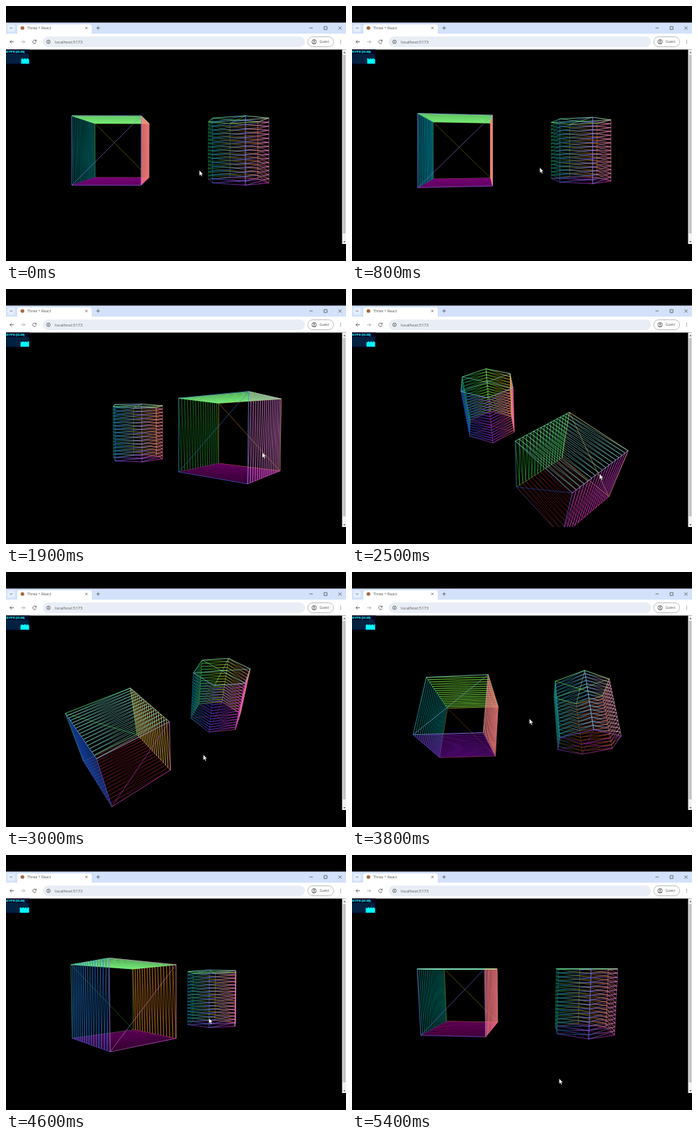
An HTML page with a canvas that plays this animation: 480 by 360 pixels, repeating every 5500 ms.

```html
<!DOCTYPE html>
<html lang="en">
<head>
<meta charset="utf-8">
<title>Wireframe orbit</title>
<style>
  html, body { margin: 0; width: 100%; height: 100%; overflow: hidden; background: #000; }
  canvas, svg { position: absolute; left: 0; top: 0; width: 480px; height: 360px; }
  text { font-family: "Open Sans", sans-serif; fill: #555; }
  .stroke { fill: none; stroke: #555; stroke-width: .8; }
  #rate { font: bold 4px "Liberation Sans", sans-serif; fill: #0ff; stroke: #0ff; stroke-width: .15; }
</style>
</head>
<body>
<canvas id="view" width="480" height="360"></canvas>
<svg viewBox="0 0 480 360">
  <!-- browser window -->
  <rect y="23.4" width="480" height="17" fill="#d3e1fa"/>
  <rect y="39" width="480" height="22.5" fill="#fff"/>
  <rect x="2" y="26" width="10.5" height="10.5" rx="3" fill="#e6eefc"/>
  <rect x="16" y="26" width="105" height="16" rx="3" fill="#fff"/>
  <circle cx="23.2" cy="31" r="2.6" fill="#a5683f"/>
  <text x="30" y="33" font-size="5.3">Three + React</text>
  <rect x="52" y="43" width="370" height="15" rx="7.5" fill="#e9eef6"/>
  <text x="69" y="52.6" font-size="5.8">localhost:5173</text>
  <rect x="426" y="43.5" width="36.5" height="14" rx="7" fill="#fff" stroke="#8b9097" stroke-width=".6"/>
  <text x="442.5" y="52.3" font-size="5">Guest</text>
  <g class="stroke">
    <path d="M5.6 30.3l1.6 1.6l1.6-1.6M112 29.5l3 3m0-3l-3 3M127.5 31h5M130 28.5v5"/>
    <path d="M428.5 31h4.5M449 29h4.2v4.2h-4.2zM469.3 29l4.4 4.4m0-4.4l-4.4 4.4"/>
    <path d="M11 50.5h-5.4m2.4-2.4l-2.4 2.4l2.4 2.4"/>
    <path d="M21.3 50.5h5.4m-2.4-2.4l2.4 2.4l-2.4 2.4" stroke="#aaa"/>
    <path d="M42.4 49.2a2.5 2.5 0 1 0 .2 2.2M42.7 47.6v2h-2"/>
    <circle cx="60" cy="50.5" r="2.5"/>
    <path d="M60 49v3"/>
    <circle cx="435" cy="50.5" r="3.2"/>
    <circle cx="435" cy="49.5" r="1"/>
    <path d="M433 52.6q2-1.6 4 0"/>
    <path d="M472.5 47.9v6" stroke-dasharray="1 1.1"/>
  </g>
  <rect x="474.5" y="61.5" width="5.5" height="274.5" fill="#f3f3f3"/>
  <rect x="475.6" y="69" width="3.8" height="252" fill="#c2c2c2"/>
  <path d="M476.2 66.5l1.6-2l1.6 2zM476.2 332l1.6 2l1.6-2z" fill="#555"/>
  <!-- frame rate panel -->
  <rect y="61.5" width="33.5" height="21" fill="#002"/>
  <rect y="67.5" width="32.5" height="14" fill="#02203f"/>
  <text id="rate" x="-1" y="66">60 FPS (31-60)</text>
  <path id="bars" fill="#0ff"/>
  <path id="cursor" d="M0 0v7.4l1.7-1.5l1.2 2.6l1.2-.6l-1.2-2.5h2.3z" fill="#fff" stroke="#333" stroke-width=".4"/>
</svg>
<script>
const LOOP = 5500, STEP = 100, SEGMENTS = 16;
const CX = 240, CY = 204, FOCAL = 343, DISTANCE = 4;
const GRAB = 600, RELEASE = 5100, LAG = 70, PIXELS_PER_DEGREE = .79;
const $ = id => document.getElementById(id);
const ctx = $('view').getContext('2d');

// Turning points of the drag: time, azimuth, elevation
const TURNS = [
  [GRAB, 0, 0], [1900, -138, 2], [2500, -128, 42], [3000, -38, 40],
  [3800, 4, -28], [4250, -18, 1], [4600, -45, 2.5], [RELEASE, 4.5, 7.2]
];

const rate = (i, k) => {
  const a = TURNS[i], b = TURNS[i + 1];
  return a && b ? (b[k] - a[k]) / (b[0] - a[0]) : 0;
};
// Slope that never overshoots a turning point
const slope = (i, k) => {
  const a = rate(i - 1, k), b = rate(i, k);
  return a * b > 0 ? 2 * a * b / (a + b) : 0;
};
function turn(time, k) {
  const t = Math.min(Math.max(time, GRAB), RELEASE);
  const i = Math.max(0, TURNS.findIndex(key => key[0] >= t) - 1);
  const a = TURNS[i], b = TURNS[i + 1], span = b[0] - a[0];
  const s = (t - a[0]) / span, r = 1 - s;
  return r * r * (1 + 2 * s) * a[k] + s * s * (3 - 2 * s) * b[k] +
    span * s * r * (r * slope(i, k) - s * slope(i + 1, k));
}

const ease = (t, from, to) => {
  const s = Math.min(Math.max((t - from) / (to - from), 0), 1);
  return s * s * (3 - 2 * s);
};
// The damped camera trails the cursor; before and after the drag the cursor moves freely
function cursorAt(t) {
  const before = 1 - ease(t, 0, 400), after = ease(t, RELEASE, 5400);
  return [
    253 - PIXELS_PER_DEGREE * turn(t + LAG, 1) + 20 * before + 43 * after,
    231 + PIXELS_PER_DEGREE * turn(t + LAG, 2) + 4 * before + 82 * after
  ];
}

const lines = [];
// Triangulated grid; point and normal are functions of (u, v) in 0..1
function grid(nu, nv, point, normal) {
  const vertex = (i, j) => ({ p: point(i / nu, j / nv), n: normal(i / nu) });
  for (let j = 0; j <= nv; j++) for (let i = 0; i <= nu; i++) {
    const a = vertex(i, j);
    if (i < nu) lines.push([a, vertex(i + 1, j)]);
    if (j < nv) lines.push([a, vertex(i, j + 1)]);
    if (i < nu && j < nv) lines.push([a, vertex(i + 1, j + 1)]);
  }
}
function face(n, u, v, nu, nv) {
  grid(nu, nv, (s, t) => n.map((c, k) =>
    c / 2 + u[k] * (s - .5) + v[k] * (t - .5) - (k ? 0 : 1)), () => n);
}
for (const s of [1, -1]) face([s, 0, 0], [0, 0, -s], [0, 1, 0], SEGMENTS, 1);
for (const s of [1, -1]) face([0, s, 0], [1, 0, 0], [0, 0, -s], 1, SEGMENTS);
for (const s of [1, -1]) face([0, 0, s], [s, 0, 0], [0, 1, 0], 1, 1);

const around = u => [Math.sin(u * 2 * Math.PI), 0, Math.cos(u * 2 * Math.PI)];
const ring = (u, y, r) => [1 + r * around(u)[0], y, r * around(u)[2]];
grid(6, SEGMENTS, (u, v) => ring(u, v - .5, .5), around);
for (const y of [1, -1]) {
  const vertex = (i, r) => ({ p: ring(i / 6, y / 2, r), n: [0, y, 0] });
  for (let i = 0; i < 6; i++) {
    lines.push([vertex(i, 0), vertex(i, .5)], [vertex(i, .5), vertex(i + 1, .5)]);
  }
}

const dot = (a, b) => a[0] * b[0] + a[1] * b[1] + a[2] * b[2];

function drawScene(azimuth, elevation) {
  const a = azimuth * Math.PI / 180, e = elevation * Math.PI / 180;
  const sa = Math.sin(a), ca = Math.cos(a), se = Math.sin(e), ce = Math.cos(e);
  const axes = [[ca, 0, -sa], [-sa * se, ce, -ca * se], [sa * ce, se, ca * ce]];
  // Lines are coloured by their normal as the camera sees it
  const project = ({ p, n }) => {
    const z = DISTANCE - dot(p, axes[2]), scale = FOCAL / z;
    return {
      x: CX + dot(p, axes[0]) * scale, y: CY - dot(p, axes[1]) * scale, z,
      color: `rgb(${axes.map(axis => Math.round(127.5 + 127.5 * dot(n, axis)))})`
    };
  };
  ctx.clearRect(0, 0, 480, 360);
  ctx.save();
  ctx.beginPath();
  ctx.rect(0, 62, 475, 274);
  ctx.clip();
  ctx.lineWidth = .9;
  ctx.globalAlpha = .6;
  const flat = lines.map(line => line.map(project));
  flat.sort((l, m) => m[0].z + m[1].z - l[0].z - l[1].z);
  for (const [p, q] of flat) {
    let style = p.color;
    if (p.color !== q.color) {
      style = ctx.createLinearGradient(p.x, p.y, q.x, q.y);
      style.addColorStop(0, p.color);
      style.addColorStop(1, q.color);
    }
    ctx.strokeStyle = style;
    ctx.beginPath();
    ctx.moveTo(p.x, p.y);
    ctx.lineTo(q.x, q.y);
    ctx.stroke();
  }
  ctx.restore();
}

function drawBars(t) {
  const count = 11 + Math.round(t / 2200);
  let d = '';
  for (let i = 0; i < count; i++) {
    const h = 7 + .8 * Math.sin(i * 1.7 + Math.floor(t / 600));
    d += `M${32.5 - count + i} 81.5v${-h}h1.05v${h}z`;
  }
  $('bars').setAttribute('d', d);
}

function frame(now) {
  const t = Math.floor(now % LOOP / STEP) * STEP;
  const [x, y] = cursorAt(t);
  drawScene(turn(t, 1), turn(t, 2));
  drawBars(t);
  $('cursor').setAttribute('transform', `translate(${x} ${y - 3})`);
  requestAnimationFrame(frame);
}
requestAnimationFrame(frame);
</script>
</body>
</html>
```
